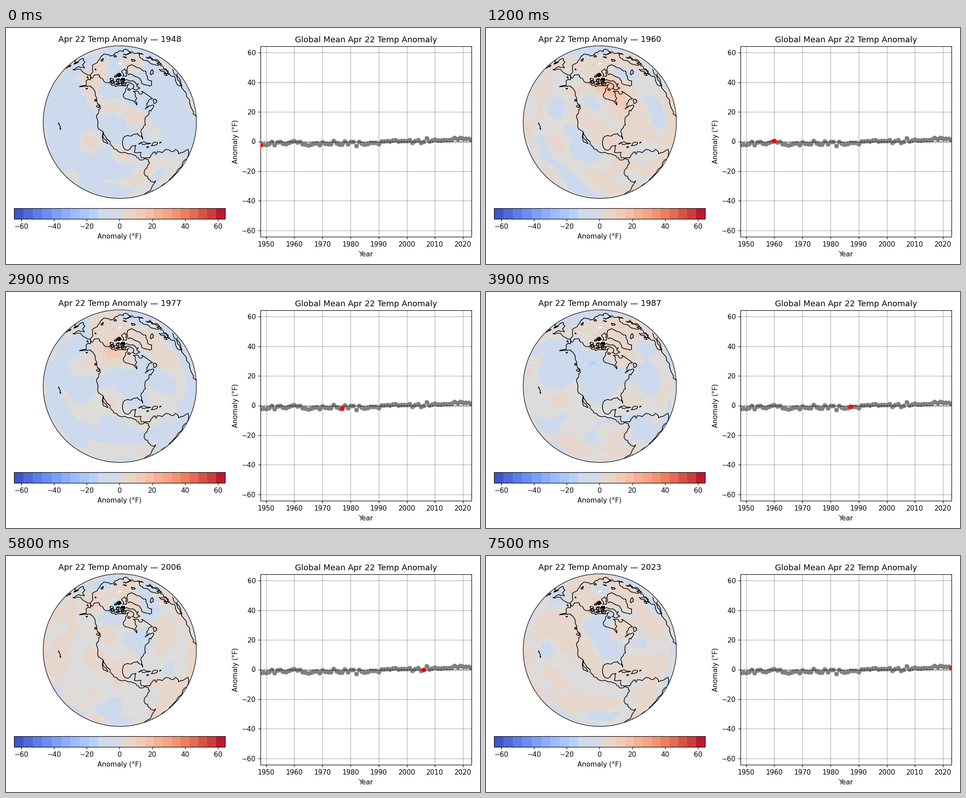
Write a matplotlib script that moves like this. It is 1058 by 529 pixels and loops after 7600 ms.

```python
import numpy as np
import matplotlib.pyplot as plt
from matplotlib.animation import FuncAnimation
from matplotlib.colors import BoundaryNorm, ListedColormap
from matplotlib.patches import Circle

W, H, DPI = 1058, 529, 108
FIRST, LAST = 1948, 2023
LIMIT = 64.3
CX, CY, R = 254, 211, 171
LON0, LAT0 = -100, np.radians(40)
CELL = 2.5

YEARS = np.arange(FIRST, LAST + 1)
warming = 2.6 / (1 + np.exp((2000 - YEARS) / 4))
MEANS = -1.2 + warming + np.random.default_rng(22).normal(0, .75, len(YEARS))

fig = plt.figure(figsize=(W / DPI, H / DPI), dpi=DPI)


def pixel_axes(x, y, w, h):
    return fig.add_axes([x / W, 1 - (y + h) / H, w / W, h / H])


def band_colors(edges):
    middles = (edges[:-1] + edges[1:]) / 2
    return plt.get_cmap("coolwarm")((middles + LIMIT) / (2 * LIMIT))


def project(lon, lat):
    """Orthographic projection; the third value is negative behind the globe."""
    lon, lat = np.radians(np.asarray(lon) - LON0), np.radians(lat)
    x = np.cos(lat) * np.sin(lon)
    y = np.cos(LAT0) * np.sin(lat) - np.sin(LAT0) * np.cos(lat) * np.cos(lon)
    z = np.sin(LAT0) * np.sin(lat) + np.cos(LAT0) * np.cos(lat) * np.cos(lon)
    return x, y, z


globe = pixel_axes(CX - R, CY - R, 2 * R, 2 * R)
globe.set(xlim=(-1, 1), ylim=(-1, 1))
globe.axis("off")
rim = globe.add_patch(Circle((0, 0), 1, fc="none", ec="black", lw=.8,
                             zorder=4, clip_on=False))
title = globe.set_title("")
rough = np.random.default_rng(4)


def fractal(line, levels=2):
    """Bend every segment sideways at its middle, again and again."""
    for _ in range(levels):
        step = np.diff(line, axis=0)
        bend = rough.normal(0, .13, (len(step), 1))
        finer = np.empty((2 * len(line) - 1, 2))
        finer[::2] = line
        finer[1::2] = line[:-1] + step / 2 + bend * step[:, ::-1] * [-1, 1]
        line = finer
    return line


def coast(*points):
    lon, lat = np.array(points, float).T
    x, y, z = project(lon, lat)
    x[z < 0] = np.nan
    path, = globe.plot(*fractal(np.column_stack([x, y])).T,
                       color="black", lw=1, zorder=3)
    path.set_clip_path(rim)


def island(*points):
    coast(*points, points[0])


def islet(lon, lat, size, stretch=1.0):
    """An uneven round island; size is half its height in degrees."""
    angles = np.linspace(0, 2 * np.pi, 8, endpoint=False)
    radius = size * rough.uniform(.6, 1.2, len(angles))
    east = lon + stretch * radius * np.cos(angles) / np.cos(np.radians(lat))
    island(*zip(east, lat + radius * np.sin(angles)))


# Pacific shore of the Americas
coast((-156.6, 71.4), (-166.2, 68.9), (-161.7, 66.1), (-168.1, 65.7), (-161, 64.2),
      (-166, 61.6), (-157.5, 58.8), (-164.8, 54.4), (-151.5, 60.8), (-146, 60.6),
      (-137.8, 58.5), (-128, 51.5), (-122.6, 48.5), (-124.5, 42.8), (-120.6, 34.6),
      (-117.1, 32.5), (-115, 27.7), (-109.6, 23), (-114.8, 31.5), (-109.3, 25.8),
      (-105.5, 21), (-101.7, 17.6), (-95, 16), (-87.6, 13), (-83.5, 8.4), (-77.8, 7.3),
      (-77.1, 3.8), (-80.5, -.8), (-81.3, -5.5), (-76.2, -14), (-70.3, -18.4), (-71.5, -30), (-74, -43))
# Gulf, Atlantic and Arctic shores
coast((-79.6, 9.5), (-83.4, 10.5), (-83.3, 15), (-88.6, 15.8), (-87, 21.4), (-90.4, 21),
      (-92, 18.7), (-95.5, 18.6), (-97.7, 22.5), (-97.3, 27.8), (-94, 29.6), (-89.4, 29.2),
      (-84, 30), (-82.7, 28), (-80.6, 25.2), (-81.3, 31), (-75.7, 35.5), (-74, 40.5),
      (-70, 41.7), (-67, 44.7), (-65.5, 43.6), (-60.2, 46), (-65, 48), (-71, 46.8),
      (-66.5, 50.2), (-57, 51.4), (-61.8, 57.4), (-64.6, 60.3), (-68, 58.4), (-70, 61.2),
      (-77.6, 62.5), (-76.6, 57), (-79.5, 54.7), (-79.3, 51.4), (-82.3, 55.1), (-94.5, 58.9),
      (-93, 62), (-86, 66.3), (-81.5, 69), (-88.5, 68), (-95, 68.6), (-108.5, 67.5),
      (-115, 68), (-125, 70), (-135, 69.3), (-148, 70.4), (-156.6, 71.4))
# South America
coast((-79.6, 9.5), (-77, 8.5), (-74.9, 11.1), (-71.8, 12.3), (-71.4, 10), (-70, 11.8),
      (-62, 10.6), (-57, 6), (-51.8, 4.6), (-50, 0), (-44, -2.6), (-37, -4.9), (-35, -8),
      (-39, -15), (-41, -22), (-48.5, -26), (-54, -34.7), (-65, -42))
# Greenland, Ellesmere and Baffin
island((-43, 83.2), (-22, 82.4), (-12.5, 81.4), (-19.5, 78), (-20, 75), (-23, 70), (-32, 68),
       (-40, 65), (-43.5, 60), (-50, 62), (-53.7, 67), (-51, 70), (-55, 72.5), (-60, 76),
       (-70, 77), (-66, 79.7), (-60, 82))
island((-68, 83.1), (-68, 81), (-76, 78.7), (-79, 76.3), (-89, 76.5), (-86, 79.5), (-91, 81.8))
island((-67, 69.5), (-62, 66.9), (-67.5, 66), (-65, 63), (-71, 62.9), (-78, 64.8), (-73, 66),
       (-73, 68), (-79, 70), (-89, 70.5), (-88, 73.5), (-80.6, 72.9))
# Eurasia and Africa
coast((-169.9, 66), (-174, 64.4), (178, 62.5), (163, 58.5), (156.8, 51), (156, 57), (164, 62.2),
      (154, 59.5), (136, 55), (141, 52), (138.2, 46.3), (129.7, 41))
coast((-169.9, 66), (180, 69), (160, 69.6), (140, 72.5), (129, 71), (113.5, 73.5), (104.4, 77.7),
      (86, 74), (72, 72.5), (72.6, 68), (54, 68.6), (43, 67), (35, 64.5), (40, 67.5), (25, 71),
      (14, 67), (5, 61), (7, 58), (11, 59), (13, 55.6), (18, 60), (24, 65.5), (22, 60), (29, 60),
      (21, 56), (11, 54), (9, 57), (8, 54), (2, 51), (-4.7, 48.4), (-1.5, 43.5), (-9, 43),
      (-9, 37), (-2, 36.7), (3, 42), (12, 42))
coast((10, 37), (-6, 35.8), (-10, 30), (-17, 21), (-17.5, 14.5), (-13, 9), (-9, 4.8))
# Cuba, Hispaniola, Great Britain, Honshu, Novaya Zemlya
island((-84.5, 22), (-80, 23), (-74.5, 20.2), (-78, 20.8))
island((-74.3, 18.4), (-72.8, 19.8), (-68.5, 18.6), (-71.4, 17.8))
island((-4, 58.6), (1.5, 52.5), (-5, 50.2), (-3, 54), (-6, 57))
island((141.5, 41), (140.8, 36), (133, 34), (139.5, 38.5))
island((52, 71.5), (57, 70.7), (57, 74), (68, 76.9), (55, 75))

for place in [(-56, 48.8, 1.9), (-77.5, 18.1, .4, 2), (-66.3, 18.2, .3, 2), (-155.5, 19.6, .5),
              (-156.4, 20.8, .3), (-158, 21.5, .3), (-159.5, 22, .3), (-126, 49.6, .9, 1.7),
              (-132, 53.2, .8), (-153.5, 57.4, .6), (-170, 63.4, .4, 2), (-8, 53.3, 1.6),
              (-19, 64.9, 1.3, 2), (18, 78.6, 1.6), (100, 79.6, 1.2), (143, 75, .9, 2),
              (180, 71.2, .4, 2), (143, 43.3, 1.2), (143, 50, 2.6, .3), (55, 80.6, .5, 3),
              (-109, 71, 2, 1.7), (-121.5, 73, 1.2), (-83.5, 64.5, 1)]:
    islet(*place)
for _ in range(16):
    islet(rough.uniform(-118, -88), rough.uniform(70, 79), rough.uniform(.5, 1.3), 1.4)

# Each screen pixel belongs to one cell of the latitude and longitude grid
axis = (np.arange(2 * R) + .5) / R - 1
px, py = np.meshgrid(axis, -axis)
inside = np.hypot(px, py) < 1
px, py = px[inside], py[inside]
depth = np.sqrt(1 - px ** 2 - py ** 2)
lat = np.degrees(np.arcsin(py * np.cos(LAT0) + depth * np.sin(LAT0)))
lon = np.degrees(np.arctan2(px, depth * np.cos(LAT0) - py * np.sin(LAT0)))
grid = np.round(np.column_stack([lat, lon]) / CELL) * CELL
cells, cell_of_pixel = np.unique(grid, axis=0, return_inverse=True)
cell_of_pixel = cell_of_pixel.ravel()
cell_lat = cells[:, 0]
sphere = np.column_stack(project(cells[:, 1] + LON0, cell_lat))

# Swings are widest over North America and the Arctic
swing = 1.9 + 4 * np.exp(-(sphere[:, 0] / .45) ** 2 - ((sphere[:, 1] - .5) / .5) ** 2)


def anomaly(year):
    rng = np.random.default_rng(year)
    waves = 24
    angles = sphere @ rng.normal(0, 6.5, (3, waves)) + rng.uniform(0, 2 * np.pi, waves)
    field = MEANS[year - FIRST] + swing * np.cos(angles).sum(axis=1) / np.sqrt(waves / 2)
    field[cell_lat > 88] = np.nan
    image = np.full(inside.shape, np.nan)
    image[inside] = field[cell_of_pixel]
    return image


cold, warm = np.linspace(-LIMIT, -12.9, 10), np.linspace(10.1, LIMIT, 11)
map_edges = np.r_[cold, -1.4, 1.4, warm]
tones = ListedColormap(band_colors(map_edges))
tones.set_bad("white")
surface = globe.imshow(np.full(inside.shape, np.nan), cmap=tones,
                       norm=BoundaryNorm(map_edges, tones.N), extent=(-1, 1, -1, 1),
                       interpolation="nearest", aspect="auto")
surface.set_clip_path(rim)

# Colour scale
scale = pixel_axes(18, 404, 471, 24)
edges = np.r_[cold, 1.6, warm]
scale.bar(edges[:-1], 1, np.diff(edges), align="edge", lw=0, antialiased=False,
          color=band_colors(edges))
scale.set(xlim=(-LIMIT, LIMIT), ylim=(0, 1), yticks=[],
          xticks=range(-60, 61, 20), xlabel="Anomaly (°F)")

# Yearly means
chart = pixel_axes(568, 41, 471, 427)
chart.set(xlim=(FIRST, LAST), ylim=(-LIMIT, LIMIT), xticks=range(1950, 2021, 10),
          yticks=range(-60, 61, 20), xlabel="Year", ylabel="Anomaly (°F)",
          title="Global Mean Apr 22 Temp Anomaly")
chart.grid(True, color="gray", lw=.5)
chart.scatter(YEARS, MEANS, color="gray", zorder=1.8)
chart.axhline(0, color="black", ls="--", lw=.8)
marker = chart.scatter([FIRST], MEANS[:1], color="red", zorder=3)


def update(frame):
    year = FIRST + frame
    surface.set_data(anomaly(year))
    title.set_text(f"Apr 22 Temp Anomaly — {year}")
    marker.set_offsets([(year, MEANS[frame])])
    return surface, title, marker


anim = FuncAnimation(fig, update, frames=len(YEARS), interval=100, repeat=True, repeat_delay=0)
plt.show()
```
